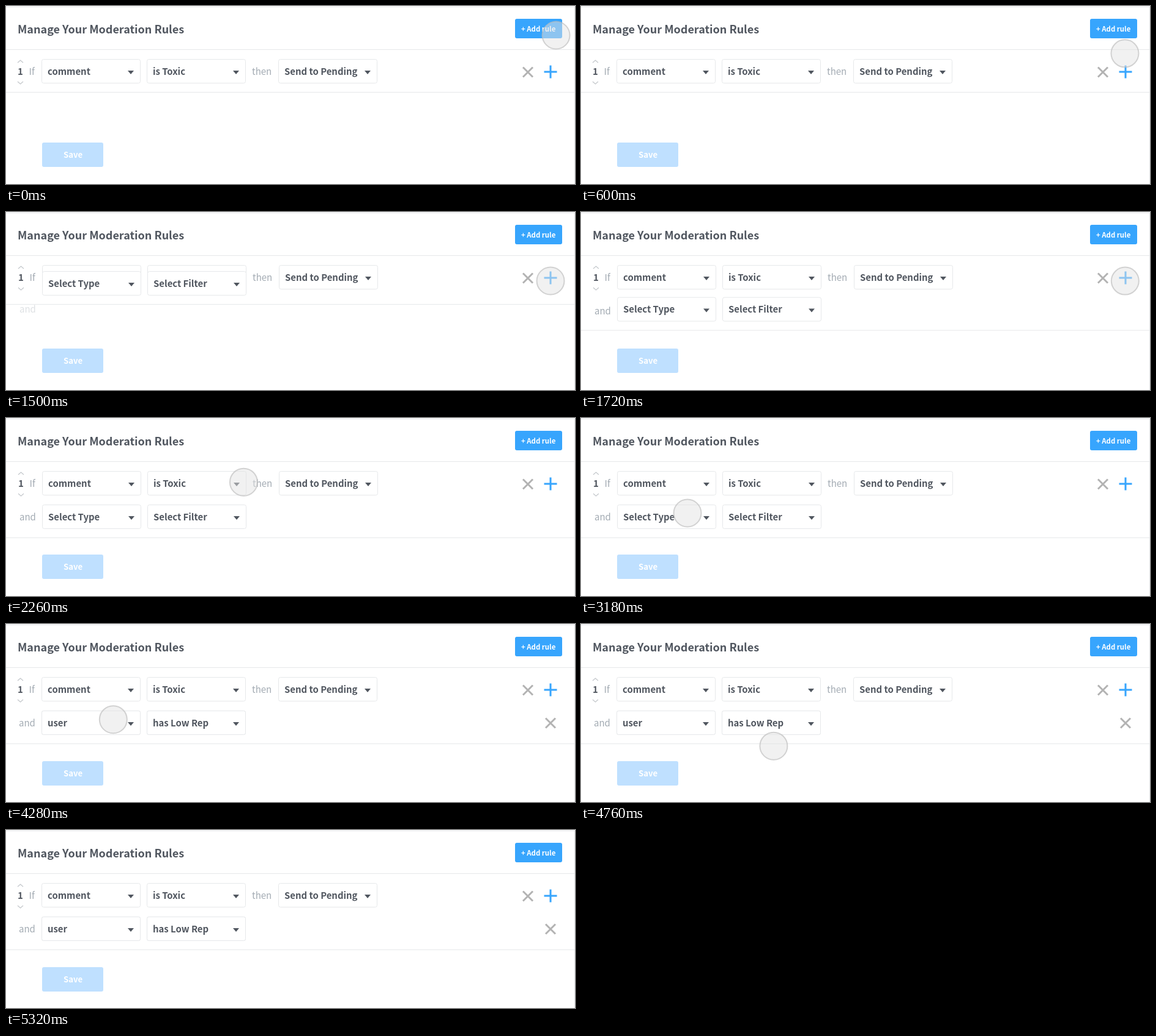
These frames come from a looping animation (930x292 px, 6.14 s). An HTML page with a canvas:

```html
<!DOCTYPE html>
<html lang="en">
<head>
<meta charset="utf-8">
<title>Moderation rules</title>
<style>
html, body { margin: 0; width: 100%; height: 100%; overflow: hidden; background: #fff; }
canvas { display: block; }
</style>
</head>
<body>
<canvas id="stage" width="930" height="292"></canvas>
<script>
const c = document.getElementById('stage').getContext('2d');
const LOOP = 6140;
const FONT = '"Noto Sans CJK SC", "Noto Sans CJK JP", "Noto Sans CJK", "Open Sans", sans-serif';
const BLUE = '#37a5fd', DARK = '#50565f', SOFT = '#a3abb3', LINE = '#e6e8ea';

const ramp = (t, a, b) => Math.min(1, Math.max(0, (t - a) / (b - a)));
const quadIn = p => p * p;
const quadOut = p => p * (2 - p);
const inOut = p => p < .5 ? 2 * p * p : 1 - 2 * (1 - p) ** 2;
const sineOut = p => Math.sin(p * Math.PI / 2);

// Pointer legs: start, end, easing, bend point, destination
const HOME = [899, 48];
const LEGS = [
  [460, 920, sineOut, [882.7, 80], [890, 113]],
  [1715, 1920, inOut, [687, 147], [484, 122]],
  [2160, 2760, quadOut, [329, 75], [174, 156]],
  [4260, 4520, inOut, [224, 184], [274, 212]],
  [4680, 5020, inOut, [454, 160], [635, 109]],
  [5220, 5320, quadIn, [697, 42], [759, -26]]
];

function pointerAt(t) {
  let from = HOME;
  for (const [a, b, ease, bend, to] of LEGS) {
    if (t < a) break;
    const k = ease(ramp(t, a, b)), start = from;
    from = to.map((v, i) => (1 - k) ** 2 * start[i] + 2 * k * (1 - k) * bend[i] + k * k * v);
    if (t < b) break;
  }
  return from;
}

function text(str, x, y, size, color, weight = 700) {
  c.font = `${weight} ${size}px ${FONT}`;
  c.fillStyle = color;
  c.fillText(str, x, y);
}

function path(points, color, width) {
  c.beginPath();
  points.forEach(([x, y], i) => i % 2 && points.length !== 3 ? c.lineTo(x, y) : i && points.length === 3 ? c.lineTo(x, y) : c.moveTo(x, y));
  c.strokeStyle = color;
  c.lineWidth = width;
  c.stroke();
}

function box(x, y, w, h, fill, border) {
  c.beginPath();
  c.roundRect(x, y, w, h, 3);
  c.fillStyle = fill;
  c.fill();
  if (border) {
    c.strokeStyle = border;
    c.lineWidth = 1;
    c.stroke();
  }
}

function select(x, y, label) {
  box(x + .5, y + .5, 161, 39, '#fff', LINE);
  text(label, x + 10, y + 25.5, 14.9, DARK);
  c.beginPath();
  c.moveTo(x + 141, y + 19);
  c.lineTo(x + 151, y + 19);
  c.lineTo(x + 146, y + 25);
  c.fill();
}

const cross = (x, y) =>
  path([[x - 8, y - 8], [x + 8, y + 8], [x + 8, y - 8], [x - 8, y + 8]], '#b3b3b3', 3);
const plus = (x, y) =>
  path([[x - 10.5, y], [x + 10.5, y], [x, y - 10.5], [x, y + 10.5]], BLUE, 3);
const chevron = (x, y, dir) =>
  path([[x - 4.5, y + 2 * dir], [x, y - 2 * dir], [x + 4.5, y + 2 * dir]], '#c3c7cb', 1.2);

function secondRow(x, y, type, filter, alpha) {
  c.globalAlpha = alpha;
  select(58 + x, y, type);
  select(230 + x, y, filter);
  c.globalAlpha = 1;
}

function draw(t) {
  const slide = inOut(ramp(t, 1380, 1780));
  const chosen = ramp(t, 3290, 3360);
  const x = t >= 1200 && t < 3320 ? 1 : 0;

  c.fillStyle = '#fff';
  c.fillRect(0, 0, 930, 292);
  c.fillStyle = LINE;
  c.fillRect(0, 1, 930, 1);
  c.fillRect(929, 1, 1, 291);
  c.fillRect(0, 71, 929, 1);
  c.fillRect(0, 141 + 55 * slide, 929, 1);

  text('Manage Your Moderation Rules', 19, 45, 18, DARK);
  box(832, 21, 77, 32, BLUE);
  text('+ Add rule', 842, 42, 11.4, '#fff');

  chevron(23.5 + x, 91, 1);
  chevron(23.5 + x, 126, -1);
  text('1', 19 + x, 113, 15, DARK);
  text('If', 37.5 + x, 112.5, 15, SOFT, 400);
  select(58 + x, 87, 'comment');
  select(230 + x, 87, 'is Toxic');
  text('then', 402 + x, 112.5, 15, SOFT, 400);
  select(445 + x, 87, 'Send to Pending');
  cross(853, 108.5);
  plus(890, 108);

  if (t >= 1200) {
    const y = 87 + 55 * slide;
    c.globalAlpha = ramp(t, 1400, 1680);
    text('and', 21 + x, 164 + 4 * slide, 15, SOFT, 400);
    secondRow(x, y, 'Select Type', 'Select Filter', ramp(t, 1200, 1440));
    if (chosen) {
      secondRow(x, y, 'user', 'has Low Rep', chosen);
      c.globalAlpha = chosen;
      cross(890, 162.5);
      c.globalAlpha = 1;
    }
  }

  const drop = t >= 3320 ? 1 : 0;
  box(59, 224 + drop, 100, 40, '#bfe0ff');
  text('Save', 94, 249 + drop, 13.2, '#fff');

  if (t < 5320) {
    const [px, py] = pointerAt(t);
    c.beginPath();
    c.arc(px, py, 22.5, 0, 7);
    c.fillStyle = 'rgba(228,228,228,.5)';
    c.fill();
    c.strokeStyle = 'rgba(190,190,190,.65)';
    c.lineWidth = 2;
    c.stroke();
  }
}

function tick() {
  draw(performance.now() % LOOP);
  requestAnimationFrame(tick);
}
tick();
</script>
</body>
</html>
```
